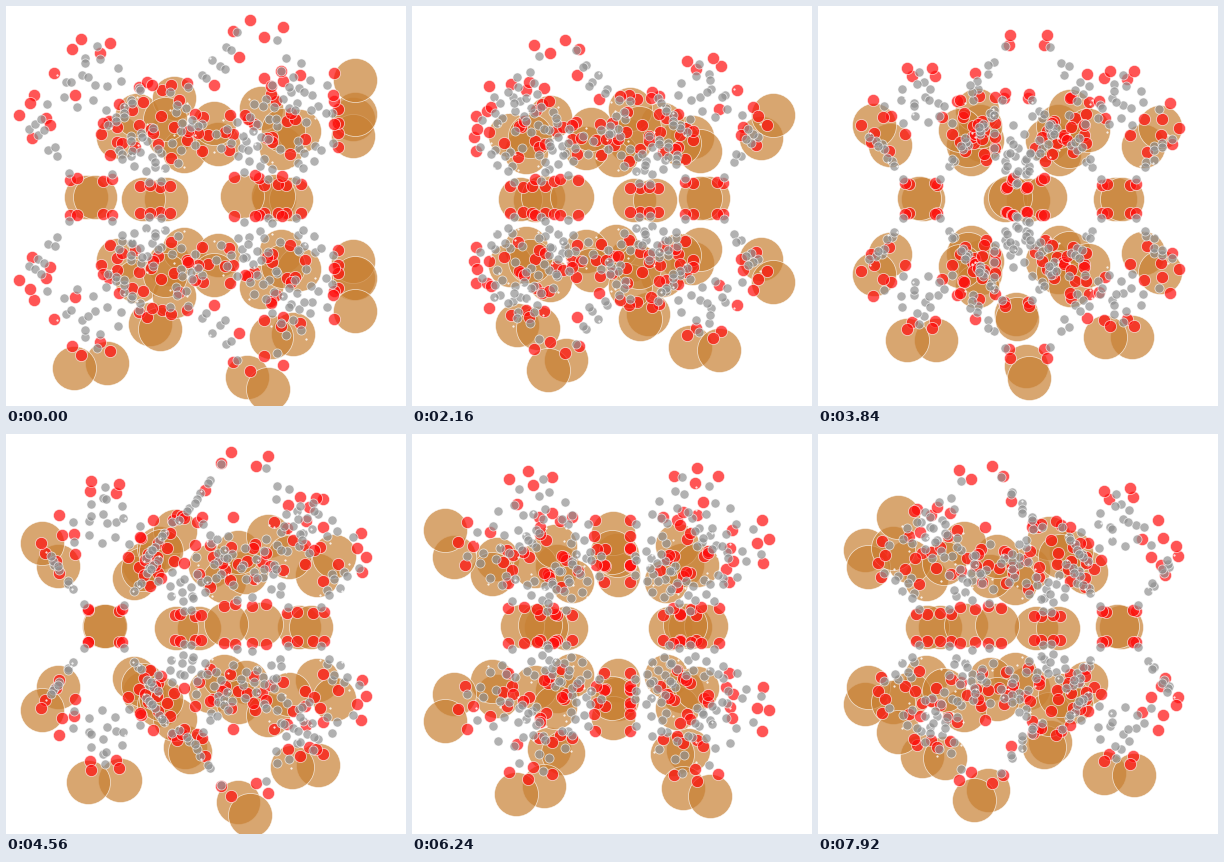
Animation, 400 px wide and 400 px high, one loop 8 s. Source, as a matplotlib script:

```python
import itertools

import matplotlib.pyplot as plt
import numpy as np
from matplotlib.animation import FuncAnimation

SIZE, DPI = 400, 100
TICK, HOLD = 40, 3              # one pose is held for three ticks of 40 ms
TICKS = 200
START, STEP = -61.3, 2.0        # turn of the cell's diagonal, degrees
BOX_TURN = 25.0                 # diagonal of the bounding box as seen by the camera
DEPTH, FOCAL = 0.974, 491.0     # camera distance in box diagonals, pixel scale
PX_PER_Z = 1.52                 # marker diameter per unit of atomic number

# atomic number, colour, independent sites of the cubic cell
ELEMENTS = [
    (29, "#c88033", [(0, 0.2147, 0.2147)]),
    (8, "#ff0d0d", [(0.3166, 0.2437, 0.0521)]),
    (6, "#909090", [(0.2955, 0.2045, 0.0701),
                    (0.3186, 0.1814, 0.1163),
                    (0.3620, 0.1380, 0.2031)]),
    (1, "#ffffff", [(0.3767, 0.1233, 0.2325)]),
]
CENTRING = [(0, 0, 0), (0, 0.5, 0.5), (0.5, 0, 0.5), (0.5, 0.5, 0)]


def expand(sites):
    """All copies of the sites in one Fm-3m cell."""
    found = set()
    for site in sites:
        for p in itertools.permutations(site):
            for signs in itertools.product((1, -1), repeat=3):
                for shift in CENTRING:
                    q = np.round(np.array(p) * signs + shift, 4) % 1
                    found.add(tuple(float(v) for v in np.round(q, 4) % 1))
    return np.array(sorted(found))


def turn(xy, degrees):
    a = np.radians(degrees)
    c, s = np.cos(a), np.sin(a)
    return xy @ np.array([[c, s], [-s, c]])


groups = [expand(sites) - 0.5 for _, _, sites in ELEMENTS]
everything = np.vstack(groups)

fig = plt.figure(figsize=(SIZE / DPI, SIZE / DPI), dpi=DPI, facecolor="white")
ax = fig.add_axes([0, 0, 1, 1])
ax.set_xlim(0, SIZE)
ax.set_ylim(SIZE, 0)
ax.axis("off")

clouds = [
    ax.scatter([], [], s=(z * PX_PER_Z * 72 / DPI) ** 2, c=color, alpha=0.7,
               edgecolors="white", linewidths=0.55, zorder=k + 1)
    for k, (z, color, _) in enumerate(ELEMENTS)
]


def spin(points, angle):
    """Turn the atoms about the upright axis, in the frame of the box."""
    return np.column_stack([turn(points[:, :2], angle - BOX_TURN), points[:, 2]])


def project(points, mid, distance):
    points = points - mid
    # the cell diagonal at angle 0 points at the viewer
    depth, side = turn(points[:, :2], BOX_TURN - 45).T
    scale = FOCAL / (distance - depth)
    x = SIZE / 2 + side * scale
    y = SIZE / 2 - points[:, 2] * scale
    return np.column_stack([x, y])[np.argsort(depth)]


def draw(tick):
    angle = START + STEP * (tick // HOLD)
    # the view is refitted to the bounding box of the turned atoms
    boxed = spin(everything, angle)
    low, high = boxed.min(axis=0), boxed.max(axis=0)
    distance = DEPTH * np.linalg.norm(high - low)
    for cloud, points in zip(clouds, groups):
        cloud.set_offsets(project(spin(points, angle), (low + high) / 2, distance))
    return clouds


anim = FuncAnimation(fig, draw, frames=TICKS, interval=TICK,
                     repeat=True, repeat_delay=0, blit=False)
plt.show()
```
